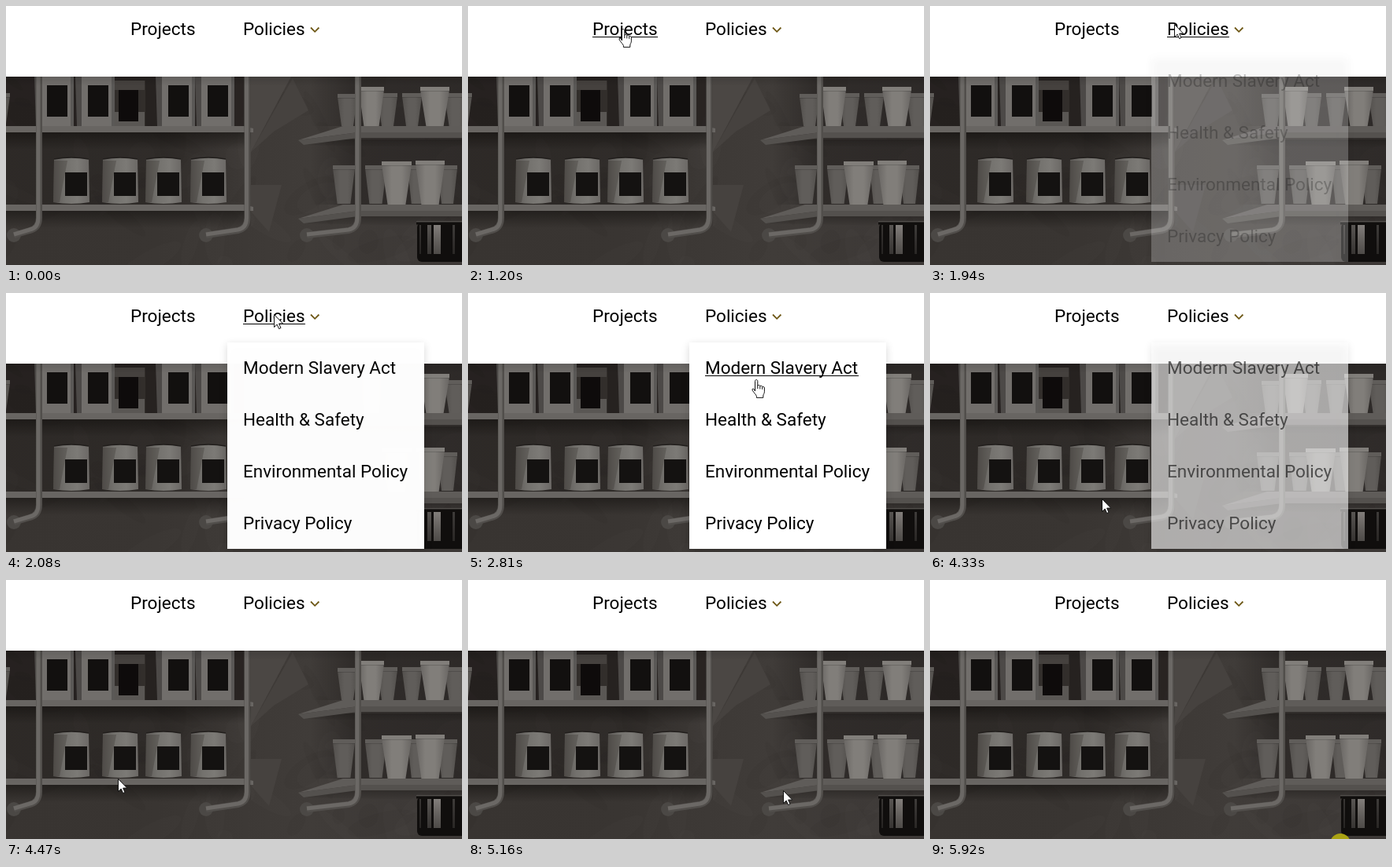
Write an HTML page with a canvas that moves like this. It is 579 by 330 pixels and loops after 6.05 s.

```html
<!DOCTYPE html>
<html lang="en">
<head>
<meta charset="utf-8">
<title>Menu hover</title>
<style>
html, body { margin: 0; width: 100%; height: 100%; overflow: hidden; background: #fff; }
canvas { display: block; }
</style>
</head>
<body>
<canvas id="stage" width="579" height="330"></canvas>
<script>
const W = 579, H = 330, LOOP = 6050, HEADER = 90;
const stage = document.getElementById('stage').getContext('2d');

function poly(c, fill, pts) {
  c.fillStyle = fill;
  c.beginPath();
  for (let i = 0; i < pts.length; i += 2) c.lineTo(pts[i], pts[i + 1]);
  c.closePath();
  c.fill();
}

function box(c, fill, x, y, w, h) {
  c.fillStyle = fill;
  c.fillRect(x, y, w, h);
}

function ramp(c, x0, y0, x1, y1, ...colors) {
  const g = c.createLinearGradient(x0, y0, x1, y1);
  colors.forEach((col, i) => g.addColorStop(i / (colors.length - 1), col));
  return g;
}

// ---- Shelf scene, painted once ----

function paintWall(c) {
  box(c, ramp(c, 0, 0, W, 0, '#383431', '#393532', '#403c39', '#3c3836'), 0, HEADER, W, H);
  let seed = 7;
  const rnd = () => (seed = (seed * 16807) % 2147483647) / 2147483647;
  for (let i = 0; i < 60; i++) {
    c.fillStyle = i % 2 ? 'rgba(255,245,235,.012)' : 'rgba(0,0,0,.03)';
    c.beginPath();
    c.ellipse(rnd() * W, HEADER + rnd() * 240, 8 + rnd() * 40, 4 + rnd() * 14, rnd() * 3, 0, 7);
    c.fill();
  }
  box(c, 'rgba(12,9,8,.42)', 0, HEADER, 302, 63);
  box(c, ramp(c, 200, 0, 302, 0, 'rgba(12,9,8,.24)', 'rgba(12,9,8,0)'), 0, 160, 302, 93);
  poly(c, '#4b4744', [311, 90, 362, 90, 311, 186]);
  poly(c, '#46423f', [364, 92, 384, 133, 340, 160, 311, 186]);
  poly(c, '#46423f', [311, 228, 350, 228, 334, 288, 311, 262]);
  const shade = ramp(c, 385, 0, 440, 0, 'rgba(12,9,8,0)', 'rgba(12,9,8,.3)');
  box(c, shade, 385, HEADER, 194, 63);
  box(c, shade, 385, 170, 194, 83);
}

function paintBag(c, mid, face) {
  poly(c, '#4c4947', [mid - 29, 90, mid - 21, 90, mid - 21, 153, mid - 27, 153]);
  box(c, face, mid - 21, 90, 42, 63);
  box(c, 'rgba(0,0,0,.2)', mid + 17, 90, 4, 63);
  box(c, '#12100f', mid - 13, 101, 26, 40);
}

function paintDarkBag(c) {
  box(c, '#322e2b', 137, 95, 40, 58);
  box(c, '#45413e', 138, 95, 38, 12);
  box(c, '#5a5754', 138, 135, 38, 18);
  box(c, '#0e0b0b', 143, 107, 25, 40);
}

function paintCan(c, x) {
  c.fillStyle = ramp(c, x, 0, x + 46, 0, '#5c5956', '#73716d', '#7c7a76', '#6b6865');
  c.beginPath();
  c.moveTo(x + 1, 195);
  c.quadraticCurveTo(x + 23, 191, x + 45, 195);
  c.lineTo(x + 46, 250);
  c.quadraticCurveTo(x + 23, 254, x, 250);
  c.fill();
  poly(c, 'rgba(20,16,14,.2)', [x + 1, 197, x + 18, 197, x + 8, 250, x, 250]);
  c.strokeStyle = '#211e1c';
  c.lineWidth = 1.5;
  c.beginPath();
  c.moveTo(x + 1, 195);
  c.quadraticCurveTo(x + 23, 191, x + 45, 195);
  c.stroke();
  box(c, '#141211', x + 15, 212, 28, 30);
}

function paintCup(c, x, w, top, base, light) {
  const inset = w * 0.2;
  const [a, b] = light ? ['#696663', '#817e7a'] : ['#53504d', '#605d5a'];
  poly(c, ramp(c, x, 0, x + w, 0, a, b, b, a), [x, top + 4, x + w, top + 4, x + w - inset, base, x + inset, base]);
  box(c, b, x, top, w, 5);
  box(c, 'rgba(0,0,0,.16)', x, top + 5, w, 1);
}

function paintShelf(c, y) {
  box(c, ramp(c, 0, y + 8, 0, y + 30, 'rgba(10,8,6,.45)', 'rgba(10,8,6,0)'), 0, y + 8, 311, 22);
  poly(c, '#686562', [0, y, 302, y, 314, y + 3, 314, y + 8, 0, y + 8]);
  poly(c, ramp(c, 0, y + 8, 0, y + 28, 'rgba(10,8,6,.4)', 'rgba(10,8,6,0)'), [376, y + 24, 447, y + 14, W, y + 14, W, y + 28]);
  poly(c, '#5f5c59', [371, y + 18, 428, y, W, y, W, y + 8, 447, y + 8]);
  poly(c, '#54514e', [371, y + 18, 447, y + 8, W, y + 8, W, y + 15, 447, y + 15, 378, y + 24]);
}

function paintPole(c, x, footX) {
  const pipe = (color, width, shift) => {
    c.strokeStyle = color;
    c.lineWidth = width;
    c.beginPath();
    c.moveTo(x + shift, HEADER);
    c.lineTo(x + shift, 270);
    c.quadraticCurveTo(x + shift, 283, x - 12, 286 + shift);
    c.lineTo(footX, 292 + shift);
    c.stroke();
  };
  c.fillStyle = '#4b4845';
  c.beginPath();
  c.arc(footX, 292, 9, 0, 7);
  c.fill();
  pipe('#514e4b', 8, 0);
  pipe('#6b6865', 5, -1);
}

function paintPot(c) {
  c.fillStyle = '#100e0d';
  c.beginPath();
  c.roundRect(522, 276, 70, 50, 6);
  c.fill();
  const shine = (x, w, alpha) =>
    box(c, ramp(c, 0, 279, 0, 316, `rgba(150,146,142,${alpha})`, `rgba(120,116,112,${alpha * 0.7})`), x, 279, w, 37);
  shine(525, 2, 0.3);
  shine(535, 5, 0.55);
  shine(543, 9, 0.85);
  shine(567, 3, 0.35);
  box(c, '#514e4b', 521, 274, 58, 1.5);
  box(c, '#100e0d', 521, 275.5, 58, 3);
}

function buildScene() {
  const layer = document.createElement('canvas');
  layer.width = W;
  layer.height = H;
  const c = layer.getContext('2d');
  c.beginPath();
  c.rect(0, HEADER, W, H);
  c.clip();
  paintWall(c);
  paintShelf(c, 153);
  paintShelf(c, 253);
  paintCup(c, -22, 27, 111, 153, false);
  paintDarkBag(c);
  [65, 117, 219, 269].forEach(mid => paintBag(c, mid, '#716e6b'));
  [60, 122, 177, 234].forEach(x => paintCan(c, x));
  [[472, 25, 111], [503, 25, 111], [557, 28, 111], [421, 25, 112]].forEach(([x, w, y]) => paintCup(c, x, w, y, 153, false));
  [[448, 32, 103], [526, 37, 103]].forEach(([x, w, y]) => paintCup(c, x, w, y, 153, true));
  [[456, 27, 203], [510, 24, 203], [548, 25, 203], [415, 28, 203]].forEach(([x, w, y]) => paintCup(c, x, w, y, 252, false));
  [[477, 38, 198], [520, 37, 197]].forEach(([x, w, y]) => paintCup(c, x, w, y, 253, true));
  paintPole(c, 42, 10);
  paintPole(c, 306.5, 254);
  paintPole(c, 447, 382);
  paintPot(c);
  box(c, ramp(c, 0, 90, 0, 102, 'rgba(0,0,0,.12)', 'rgba(0,0,0,0)'), 0, 90, W, 12);
  return layer;
}

// ---- Motion ----

// Each move: number of held positions, then keys of [time, x, y] for the pointer tip.
const MOVES = [
  { steps: 13, keys: [[370, 482, 275], [650, 308, 150], [930, 200, 70], [1200, 198, 29]] },
  { steps: 6, keys: [[1800, 225, 28], [1940, 312, 23], [2080, 342, 27], [2140, 342, 27]] },
  { steps: 20, keys: [[2470, 345, 36], [2810, 367, 106], [3030, 367, 147], [3640, 362, 273], [3840, 364, 278]] },
  { steps: 5, keys: [[4190, 330, 276], [4260, 270, 268], [4400, 165, 255], [4470, 142, 253]] },
  { steps: 14, keys: [[4740, 150, 253], [5020, 325, 262], [5300, 474, 274], [5650, 514, 332]] }
];

const FADE = [[1900, 0], [2070, 0.98], [2140, 1], [4230, 1], [4330, 0.6], [4400, 0.25], [4460, 0]];

function track(keys, t) {
  if (t <= keys[0][0]) return keys[0].slice(1);
  for (let i = 1; i < keys.length; i++) {
    const a = keys[i - 1], b = keys[i];
    if (t <= b[0]) {
      const p = (t - a[0]) / (b[0] - a[0]);
      return a.slice(1).map((v, j) => v + (b[j + 1] - v) * p);
    }
  }
  return keys[keys.length - 1].slice(1);
}

function pointerAt(t) {
  const move = MOVES.filter(m => t >= m.keys[0][0]).pop();
  if (!move) return null;
  const start = move.keys[0][0], end = move.keys[move.keys.length - 1][0];
  const step = (end - start) / (move.steps - 1);
  const held = start + Math.floor((t - start) / step + 0.3) * step;
  return track(move.keys, held).map(Math.round);
}

// ---- Interface ----

const ITEMS = ['Modern Slavery Act', 'Health & Safety', 'Environmental Policy', 'Privacy Policy'];

function link(text, x, base, hovered) {
  stage.fillStyle = '#000';
  stage.fillText(text, x, base);
  if (hovered) stage.fillRect(x, base + 2, Math.ceil(stage.measureText(text).width), 1);
}

function hoverAt(p, menuOpen) {
  if (!p) return '';
  const [x, y] = p;
  if (y > 15 && y < 45) {
    if (x > 157 && x < 242) return 'Projects';
    if (x > 300 && x < 400) return 'Policies';
  }
  if (menuOpen && x > 281 && x < 531 && y >= 62) return ITEMS[Math.floor((y - 62) / 66)] || '';
  return '';
}

function drawMenu(alpha, hover) {
  stage.save();
  stage.globalAlpha = alpha;
  stage.save();
  stage.shadowColor = 'rgba(0,0,0,.16)';
  stage.shadowBlur = 10;
  stage.shadowOffsetY = 3;
  box(stage, '#fff', 281, 63, 250, 263);
  stage.restore();
  ITEMS.forEach((text, i) => link(text, 301, 103 + 66 * i, hover === text));
  stage.restore();
}

const ARROW = new Path2D('M.5 .5V16.6L4.2 13.1L6.6 18.6L9 17.5L6.6 12.1H11.7Z');
const HAND = new Path2D('M4.5 15V2.3C4.5 0 7.8 0 7.8 2.3V8.2C8.2 6.9 10.6 7 10.8 8.8C11.4 7.7 13.6 8 13.7 9.7C14.4 8.9 16.4 9.2 16.4 11V15.8C16.4 18 15 19 14.8 21V23.4H6.4V21.4C5.6 19.5 3.8 18 1.3 14.2C.2 12.4 1.9 11.2 3.2 12.6Z');
const KNUCKLES = new Path2D('M7.8 8V12M10.8 9V12.4M13.7 10V12.8');

function drawPointer([x, y], isHand) {
  stage.save();
  stage.translate(isHand ? x - 7 : x, y);
  stage.fillStyle = '#fff';
  stage.strokeStyle = '#111';
  stage.lineWidth = 1;
  stage.lineJoin = 'round';
  const shape = isHand ? HAND : ARROW;
  stage.fill(shape);
  stage.stroke(shape);
  if (isHand) stage.stroke(KNUCKLES);
  stage.restore();
}

const scene = buildScene();

function draw(t) {
  const pointer = pointerAt(t);
  const [menuAlpha] = track(FADE, t);
  const hover = hoverAt(pointer, menuAlpha > 0.5);

  box(stage, '#fff', 0, 0, W, H);
  stage.drawImage(scene, 0, 0);
  stage.font = '22.5px Roboto, sans-serif';
  link('Projects', 158, 37, hover === 'Projects');
  link('Policies', 301, 37, hover === 'Policies');
  stage.strokeStyle = '#6e5816';
  stage.lineWidth = 1.8;
  stage.beginPath();
  stage.moveTo(387, 27.5);
  stage.lineTo(392.2, 32.8);
  stage.lineTo(397.4, 27.5);
  stage.stroke();

  if (menuAlpha > 0) drawMenu(menuAlpha, hover);
  if (pointer) drawPointer(pointer, hover !== '' && hover !== 'Policies');
  if (t >= 5920) {
    stage.fillStyle = '#aaa314';
    stage.beginPath();
    stage.arc(521, 336, 13, 0, 7);
    stage.fill();
  }
}

function tick() {
  draw(performance.now() % LOOP);
  requestAnimationFrame(tick);
}
tick();
</script>
</body>
</html>
```
